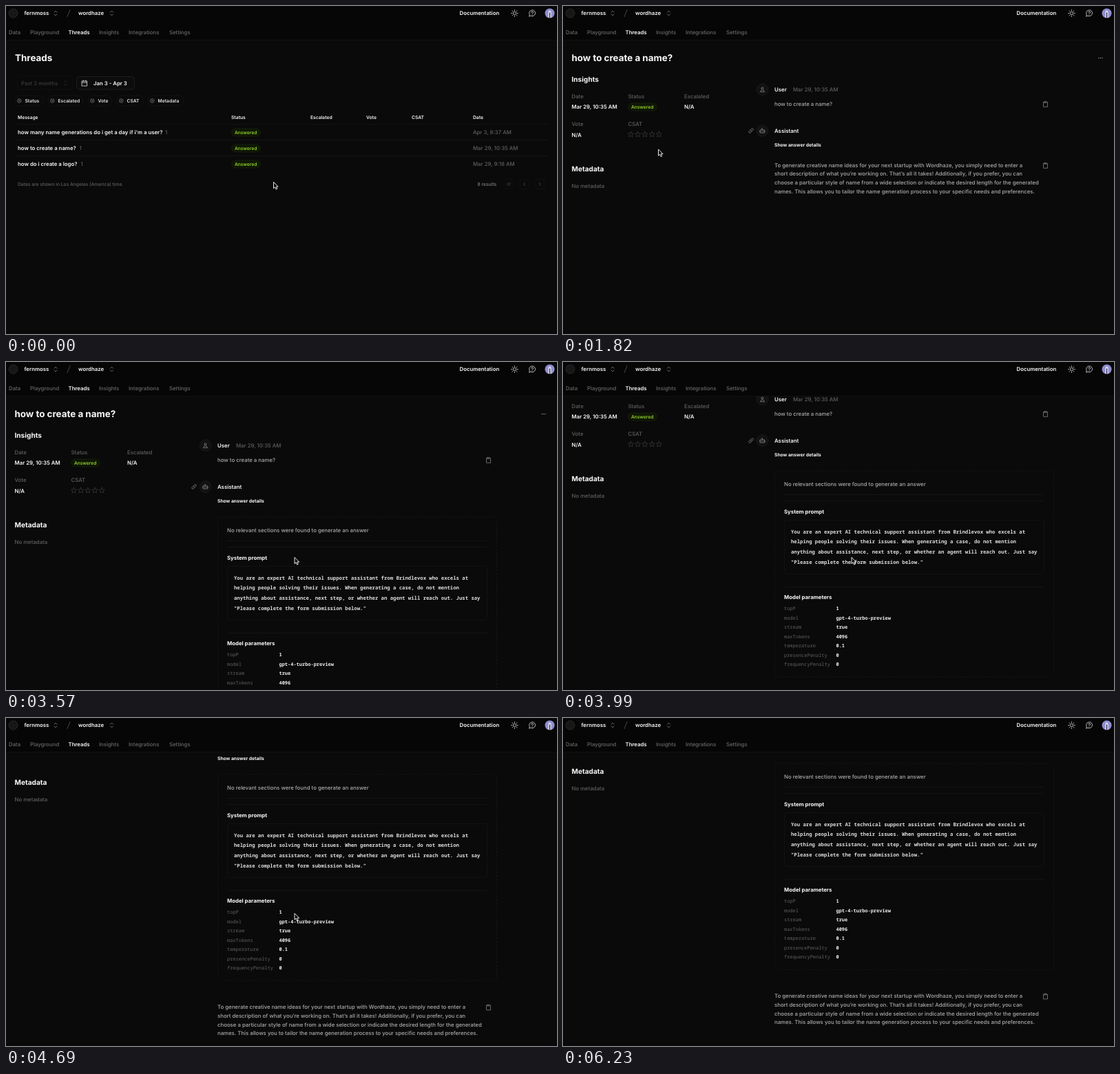
Animation, 800 px wide and 476 px high, one loop 6300 ms. Source, as an HTML page:

```html
<!DOCTYPE html>
<html lang="en">
<head>
<meta charset="utf-8">
<title>Threads</title>
<style>
  html, body { margin: 0; width: 100%; height: 100%; overflow: hidden; background: #0a0a0a; }
  svg { display: block; width: 800px; height: 476px; font-family: Inter, sans-serif; }
  text { white-space: pre; text-rendering: geometricPrecision; }
  .mono { font-family: "Noto Sans Mono", monospace; }
</style>
</head>
<body>
<svg id="stage" viewBox="0 0 800 476" xmlns="http://www.w3.org/2000/svg"></svg>
<script>
const LOOP = 6300, OPEN_PAGE = 1680, OPEN_DETAILS = 3080, HIDE_CURSOR = 5460;
const SCROLL_START = 3616, SCROLL_MAX = 159, DETAILS_SHIFT = 331.5;
const WHITE = '#fafafa', SOFT = '#acacac', DIM = '#606060', LINE = '#161616';
const BODY = 7.8, SMALL = 6.72, HEADING = 10.1, TITLE = 13.4;
const MEDIUM = 500, SEMI = 600, BOLD = 700;

// Text is placed by its left edge and the middle of its capitals.
function text(x, cy, str, { size = BODY, fill = WHITE, weight = SEMI, cls = '' } = {}) {
  return `<text x="${x}" y="${cy + size * 0.36}" font-size="${size}" font-weight="${weight}" fill="${fill}" class="${cls}">${str}</text>`;
}
const rect = (x, y, w, h, r, fill, stroke = 'none', extra = '') =>
  `<rect x="${x}" y="${y}" width="${w}" height="${h}" rx="${r}" fill="${fill}" stroke="${stroke}" stroke-width=".7" ${extra}/>`;
const circle = (x, y, r, fill, stroke = 'none') =>
  `<circle cx="${x}" cy="${y}" r="${r}" fill="${fill}" stroke="${stroke}" stroke-width=".8"/>`;
const line = (x1, x2, y) => `<path d="M${x1} ${y}H${x2}" stroke="${LINE}" stroke-width=".8"/>`;
const icon = (x, y, d, stroke = DIM, width = 0.8) =>
  `<path transform="translate(${x} ${y})" d="${d}" fill="none" stroke="${stroke}" stroke-width="${width}" stroke-linecap="round" stroke-linejoin="round"/>`;

const UPDOWN = 'M-2 -1.4L0 -3.4L2 -1.4M-2 1.4L0 3.4L2 1.4';
const CLIP = 'M-1.4 -3H-3V3.8H3V-3H1.4M-1.4 -3.9H1.4V-2.2H-1.4Z';

function answered(x, cy) {
  return rect(x, cy - 5.5, 42, 11, 5.5, '#0e1605', '#17230a') +
    text(x + 4.4, cy, 'Answered', { size: SMALL, fill: '#a3e635', weight: MEDIUM });
}

function sun(x, y) {
  let rays = '';
  for (let i = 0; i < 8; i++) {
    const a = i * Math.PI / 4, c = Math.cos(a), s = Math.sin(a);
    rays += `M${3.8 * c} ${3.8 * s}L${4.9 * c} ${4.9 * s}`;
  }
  return circle(x, y, 2.2, 'none', '#e4e4e4') + icon(x, y, rays, '#e4e4e4');
}

function star(x, y) {
  let d = '';
  for (let i = 0; i < 10; i++) {
    const a = i * Math.PI / 5, r = i % 2 ? 1.9 : 4.3;
    d += `${i ? 'L' : 'M'}${r * Math.sin(a)} ${-r * Math.cos(a)}`;
  }
  return icon(x, y, d + 'Z', '#444', 0.6);
}

function header() {
  const tabs = [[4, 'Data'], [35, 'Playground'], [90.5, 'Threads'], [135, 'Insights'], [178, 'Integrations'], [237, 'Settings']];
  return rect(0, 0, 800, 49, 0, '#060606') + line(0, 800, 49.4) +
    circle(10.5, 10.5, 6.5, '#171717', '#2c2c2c') +
    text(26.5, 10.5, 'fernmoss') + icon(72, 10.5, UPDOWN, '#888') +
    icon(91, 10.5, 'M-2 5L2 -5', '#555') +
    text(105, 10.5, 'wordhaze') + icon(153.5, 10.5, UPDOWN, '#888') +
    text(658.5, 10.5, 'Documentation') + sun(738.5, 10.5) +
    icon(764, 10.5, 'M-4.3 4.3L-3.8 1.9A4.4 4.4 0 1 1 -1.8 3.8ZM-1.3 -1.2A1.4 1.4 0 1 1 .5 .1L0 .8M0 2.1V2.2', '#e4e4e4') +
    circle(789.5, 10.5, 7, '#8f8dd2') +
    '<path d="M787.3 17V10.5Q787.3 6.5 789.5 6.5T791.7 10.5V17Z" fill="#dcdcec"/><path d="M788.8 17V9.5H790.2V17Z" fill="#33334d"/>' +
    tabs.map(([x, s]) => text(x, 38, s, s === 'Threads' ? {} : { fill: '#686868', weight: MEDIUM })).join('');
}

function listPage() {
  const pills = [[13, 41, 'Status'], [61, 51, 'Escalated'], [119, 35, 'Vote'], [161, 39, 'CSAT'], [206, 52, 'Metadata']];
  const heads = [[17, 'Message'], [327, 'Status'], [442, 'Escalated'], [523, 'Vote'], [589, 'CSAT'], [678, 'Date']];
  const rows = [
    ['how many name generations do i get a day if i\'m a user?', 231, 'Apr 3, 8:37 AM'],
    ['how to create a name?', 106.5, 'Mar 29, 10:35 AM'],
    ['how do i create a logo?', 108.5, 'Mar 29, 9:18 AM']
  ];
  const dim = { fill: DIM, weight: MEDIUM };
  return text(13, 75.5, 'Threads', { size: TITLE, weight: BOLD }) +
    rect(16, 102, 81, 19, 4, 'none', '#141414') +
    text(22, 112, 'Past 3 months', { fill: '#3c3c3c', weight: MEDIUM }) + icon(86.5, 112, UPDOWN, '#2c2c2c') +
    rect(102.5, 102.5, 84, 18.5, 4, '#0c0c0c', '#262626') +
    icon(114, 112, 'M-3.6 -3H3.6V4H-3.6ZM-3.6 -.8H3.6M-1.8 -4.2V-2.2M1.8 -4.2V-2.2', '#e4e4e4') + text(127, 112, 'Jan 3 - Apr 3') +
    pills.map(([x, w, s]) => rect(x, 130, w, 15, 7.5, 'none', '#181818') + circle(x + 6.3, 137.5, 2.8, 'none', '#777') +
      icon(x + 6.3, 137.5, 'M-1.3 0H1.3M0 -1.3V1.3', '#777', 0.6) + text(x + 14.5, 137.5, s, { size: SMALL, fill: '#e8e8e8' })).join('') +
    heads.map(([x, s]) => text(x, 162, s, { size: SMALL })).join('') +
    rect(13, 0, 778, 23, 0, '#141414', 'none', 'id="hover"') +
    rows.map(([msg, x, date], i) => {
      const y = 183.5 + 23 * i;
      return line(13, 787, y - 12) + text(17, y, msg) + text(x, y, '1', dim) +
        answered(327.5, y) + text(678, y, date, dim);
    }).join('') +
    text(17, 258.5, 'Dates are shown in Los Angeles (America) time.', { ...dim, size: SMALL }) +
    text(684.5, 258.5, '8 results', { size: SMALL, fill: '#808080', weight: MEDIUM }) +
    [730, 752.5, 775].map(x => rect(x - 7, 251.5, 14, 14, 3, 'none', '#131313')).join('') +
    icon(730, 258.5, 'M-.3 -2L-2.3 0L-.3 2M2.3 -2L.3 0L2.3 2', '#555') +
    icon(752.5, 258.5, 'M1 -2L-1 0L1 2', '#555') + icon(775, 258.5, 'M-1 -2L1 0L-1 2', '#555');
}

function details() {
  const code = { cls: 'mono', size: 7.27, fill: '#dcdcdc' };
  const value = { ...code, size: 6.97, fill: '#eee' };
  const key = { ...value, fill: DIM, weight: MEDIUM };
  const prompt = [
    'You are an expert AI technical support assistant from Brindlevox who excels at',
    'helping people solving their issues. When generating a case, do not mention',
    'anything about assistance, next step, or whether an agent will reach out. Just say',
    '"Please complete the form submission below."'
  ];
  const params = { topP: 1, model: 'gpt-4-turbo-preview', stream: true, maxTokens: 4096, temperature: 0.1, presencePenalty: 0, frequencyPenalty: 0 };
  return rect(307.5, 225, 405, 299, 4, 'none', '#1b1b1b', 'stroke-dasharray="3 2"') +
    text(321, 244.5, 'No relevant sections were found to generate an answer', { fill: SOFT, weight: MEDIUM }) +
    line(321, 698, 259.5) + line(321, 698, 268.5) + text(321, 284, 'System prompt', { weight: BOLD }) +
    rect(321.5, 296.5, 377, 78, 4, 'none', LINE) +
    prompt.map((s, i) => text(331, 313 + 14.85 * i, s, code)).join('') +
    line(321, 698, 393.5) + text(321, 408, 'Model parameters', { weight: BOLD }) +
    Object.entries(params).map(([name, val], i) => {
      const y = 424.5 + 13.5 * i;
      return text(321, y, name, key) + text(396.5, y, val, value);
    }).join('');
}

function threadPage() {
  const label = { fill: DIM, weight: MEDIUM }, para = { fill: SOFT, weight: MEDIUM };
  const answer = [
    'To generate creative name ideas for your next startup with Wordhaze, you simply need to enter a',
    'short description of what you’re working on. That’s all it takes! Additionally, if you prefer, you can',
    'choose a particular style of name from a wide selection or indicate the desired length for the generated',
    'names. This allows you to tailor the name generation process to your specific needs and preferences.'
  ];
  return text(12.5, 75.5, 'how to create a name?', { size: TITLE, weight: BOLD }) +
    [-2.4, 0, 2.4].map(d => circle(780.5 + d, 75.5, 0.7, '#999')).join('') +
    text(12.5, 106, 'Insights', { size: HEADING, weight: BOLD }) +
    text(12.5, 131, 'Date', label) + text(94.5, 131, 'Status', label) + text(176, 131, 'Escalated', label) +
    text(12.5, 146.5, 'Mar 29, 10:35 AM') + answered(94.5, 146.5) + text(176, 146.5, 'N/A') +
    text(12.5, 171.5, 'Vote', label) + text(94.5, 171.5, 'CSAT', label) + text(12.5, 187, 'N/A') +
    [0, 1, 2, 3, 4].map(i => star(98.5 + 10.2 * i, 186.5)).join('') +
    text(12.5, 236.5, 'Metadata', { size: HEADING, weight: BOLD }) + text(12.5, 261.5, 'No metadata', label) +
    circle(289.5, 121, 8.5, '#121212', '#1c1c1c') +
    icon(289.5, 121, 'M-1.5 -1.6A1.5 1.5 0 1 1 1.5 -1.6A1.5 1.5 0 1 1 -1.5 -1.6M-2.8 3.2Q-2.6 .8 0 .8T2.8 3.2Z', '#888') +
    text(307, 121.5, 'User') + text(334, 121.5, 'Mar 29, 10:35 AM', label) +
    text(307, 142.5, 'how to create a name?', para) + icon(700.5, 142.5, CLIP, '#808080') +
    icon(273, 181, 'M-.5 -1.6L.9 -3A1.5 1.5 0 0 1 3 -.9L1.4 .7A1.5 1.5 0 0 1 -.6 .7M.5 1.6L-.9 3A1.5 1.5 0 0 1 -3 .9L-1.4 -.7A1.5 1.5 0 0 1 .6 -.7', '#808080') +
    circle(289.5, 181, 8.5, '#121212', '#1c1c1c') +
    icon(289.5, 181, 'M-3 -1.2H3V3H-3ZM0 -1.2V-3.2H-1.4M-4.2 .8H-3M3 .8H4.2M-1.2 .5V1.3M1.2 .5V1.3', '#888') +
    text(307, 181, 'Assistant') + text(307, 202, 'Show answer details', { size: SMALL, weight: BOLD }) +
    `<g id="details">${details()}</g><g id="answer">` +
    answer.map((s, i) => text(307, 231 + 12.67 * i, s, para)).join('') + icon(700.5, 231.5, CLIP, '#808080') + '</g>';
}

const stage = document.getElementById('stage');
stage.innerHTML = rect(0, 0, 800, 476, 0, '#0a0a0a') +
  `<g id="list">${listPage()}</g><g id="thread">${threadPage()}</g>${header()}` +
  '<g id="cursor"><path id="arrow" d="M0 0V9.2L2.1 7.3L3.6 10.6L5.2 9.9L3.8 6.7H6.6Z" fill="#0a0a0a" stroke="#fff" stroke-width=".9" stroke-linejoin="round"/>' +
  '<path id="hand" d="M-.8 .6Q0 -.6 .8 .6V3.6L4 4.3Q4.8 4.6 4.7 5.6L4 9.2H-.2L-3.2 6Q-3.2 4.8 -2 5.2L-.8 6.1Z" fill="#fff" stroke="#111" stroke-width=".6" stroke-linejoin="round"/></g>';

const el = {};
for (const id of ['list', 'thread', 'hover', 'details', 'answer', 'cursor', 'arrow', 'hand']) el[id] = document.getElementById(id);
const show = (node, on) => node.setAttribute('display', on ? 'inline' : 'none');
const move = (node, x, y) => node.setAttribute('transform', `translate(${x} ${y})`);

// time, x, y of the pointer tip
const path = [
  [0, 388.5, 255.5], [250, 388.5, 255.5], [1120, 138.5, 208], [1950, 138.5, 208],
  [2590, 326, 215.5], [2900, 341, 203], [3120, 341, 203], [3520, 419, 283.5], [LOOP, 419, 283.5]
];

function pointer(t) {
  const i = path.findIndex(p => p[0] > t);
  const [t0, x0, y0] = path[i - 1], [t1, x1, y1] = path[i];
  const k = (1 - Math.cos(Math.PI * (t - t0) / (t1 - t0))) / 2;
  return [x0 + (x1 - x0) * k, y0 + (y1 - y0) * k];
}

// Soft start followed by a long exponential glide.
function scrollAt(t) {
  const x = Math.max(0, t - SCROLL_START);
  return Math.round(SCROLL_MAX * (1 - 1.74 * Math.exp(-x / 382) + 0.74 * Math.exp(-x / 162)));
}

function render(t) {
  const [x, y] = pointer(t);
  const onList = t < OPEN_PAGE, open = t >= OPEN_DETAILS;
  const row = Math.floor((y - 172) / 23);
  const overRow = onList && row >= 0 && row < 3;
  const overButton = !onList && x > 305 && x < 377 && y > 196 && y < 208;

  show(el.list, onList);
  show(el.thread, !onList);
  show(el.hover, overRow);
  el.hover.setAttribute('y', 172 + 23 * row);
  show(el.details, open);
  move(el.answer, 0, open ? DETAILS_SHIFT : 0);
  move(el.thread, 0, -scrollAt(t));

  move(el.cursor, x, y);
  show(el.cursor, t < HIDE_CURSOR);
  show(el.hand, overRow || overButton);
  show(el.arrow, !overRow && !overButton);
}

const start = performance.now();
function tick() {
  render((performance.now() - start) % LOOP);
  requestAnimationFrame(tick);
}
tick();
</script>
</body>
</html>
```
